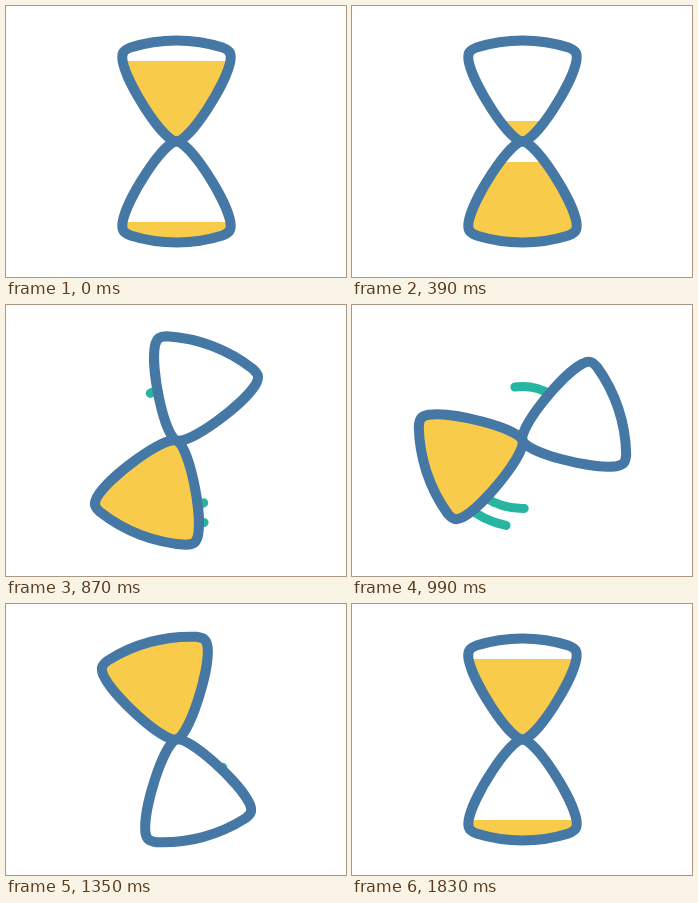
Recreate the animation shown at these times as an HTML page with a canvas. Size 340 by 271 pixels, loop 1860 ms.

```html
<!DOCTYPE html>
<html lang="en">
<head>
<meta charset="utf-8">
<title>Hourglass</title>
<style>
  html, body { margin: 0; width: 100%; height: 100%; overflow: hidden; background: #fff; }
  canvas { display: block; width: 340px; height: 271px; }
</style>
</head>
<body>
<canvas id="stage" width="340" height="271"></canvas>
<script>
const ctx = document.getElementById('stage').getContext('2d');
const LOOP = 1860, STEP = 30, TURN = 540;
const CX = 170.5, CY = 135.5, RAD = Math.PI / 180;
const BLUE = '#4678a6', SAND = '#f8cb4b', TEAL = '#25b5a0';

// Upper bulb, with its tip at the origin
const bulb = new Path2D(`M0 0C-14 -1 -50 -58 -54 -81C-55 -89 -53 -91 -46 -94
  C-30 -99 -15 -101 0 -101C15 -101 30 -99 46 -94C53 -91 55 -89 54 -81C50 -58 14 -1 0 0Z`);

// Trails: radius, resting offset and extra lag in degrees, axis of the bulb
const trails = [
  { r: 54, rest: 38, lag: 52, axis: 90 },
  { r: 68, rest: 33, lag: 50, axis: -90 },
  { r: 86.5, rest: 31, lag: 37, axis: -90 }
];

// Cubic Bezier easing with y handles at 0 and 1
function ease(x, x1, x2) {
  let lo = 0, hi = 1;
  for (let i = 0; i < 30; i++) {
    const s = (lo + hi) / 2, q = 1 - s;
    if (3 * q * q * s * x1 + 3 * q * s * s * x2 + s * s * s < x) lo = s;
    else hi = s;
  }
  return lo * lo * (3 - 2 * lo);
}

function angleAt(t) {
  return t <= TURN ? 0 : 180 * ease((t - TURN) / (LOOP - TURN), 0.6, 0.03) - 180;
}

// Distance of both sand surfaces from the neck
function levelAt(t) {
  if (t <= TURN) return Math.max(0, 80.5 - t * 60 / 390);
  if (t < 1500) return 110;
  return Math.max(80.5, 98 - 17.5 * (t - 1500) / 330);
}

function drawTrails(t, angle) {
  const u = (t - 830) / 540;
  if (u <= 0 || u >= 1) return;
  ctx.strokeStyle = TEAL;
  ctx.lineWidth = 9;
  ctx.lineCap = 'round';
  for (const { r, rest, lag, axis } of trails) {
    const head = axis + angle;
    const tail = head - rest - lag * Math.sin(Math.PI * u);
    ctx.beginPath();
    ctx.arc(0, 0, r, tail * RAD, head * RAD);
    ctx.stroke();
  }
}

function drawBulb(flip, top, height) {
  ctx.save();
  ctx.scale(1, flip);
  ctx.fillStyle = '#fff';
  ctx.fill(bulb);
  ctx.save();
  ctx.clip(bulb);
  ctx.fillStyle = SAND;
  ctx.fillRect(-70, top, 140, height);
  ctx.restore();
  ctx.strokeStyle = BLUE;
  ctx.lineWidth = 10;
  ctx.lineJoin = 'round';
  ctx.stroke(bulb);
  ctx.restore();
}

function draw(t) {
  const angle = angleAt(t), level = levelAt(t);
  ctx.fillStyle = '#fff';
  ctx.fillRect(0, 0, 340, 271);
  ctx.save();
  ctx.translate(CX, CY);
  drawTrails(t, angle);
  ctx.rotate(angle * RAD);
  drawBulb(1, -level, level);
  drawBulb(-1, -110, 110 - level);
  ctx.restore();
}

const start = performance.now();
function tick() {
  const t = (performance.now() - start) % LOOP;
  draw(Math.floor(t / STEP) * STEP);
  requestAnimationFrame(tick);
}
tick();
</script>
</body>
</html>
```
